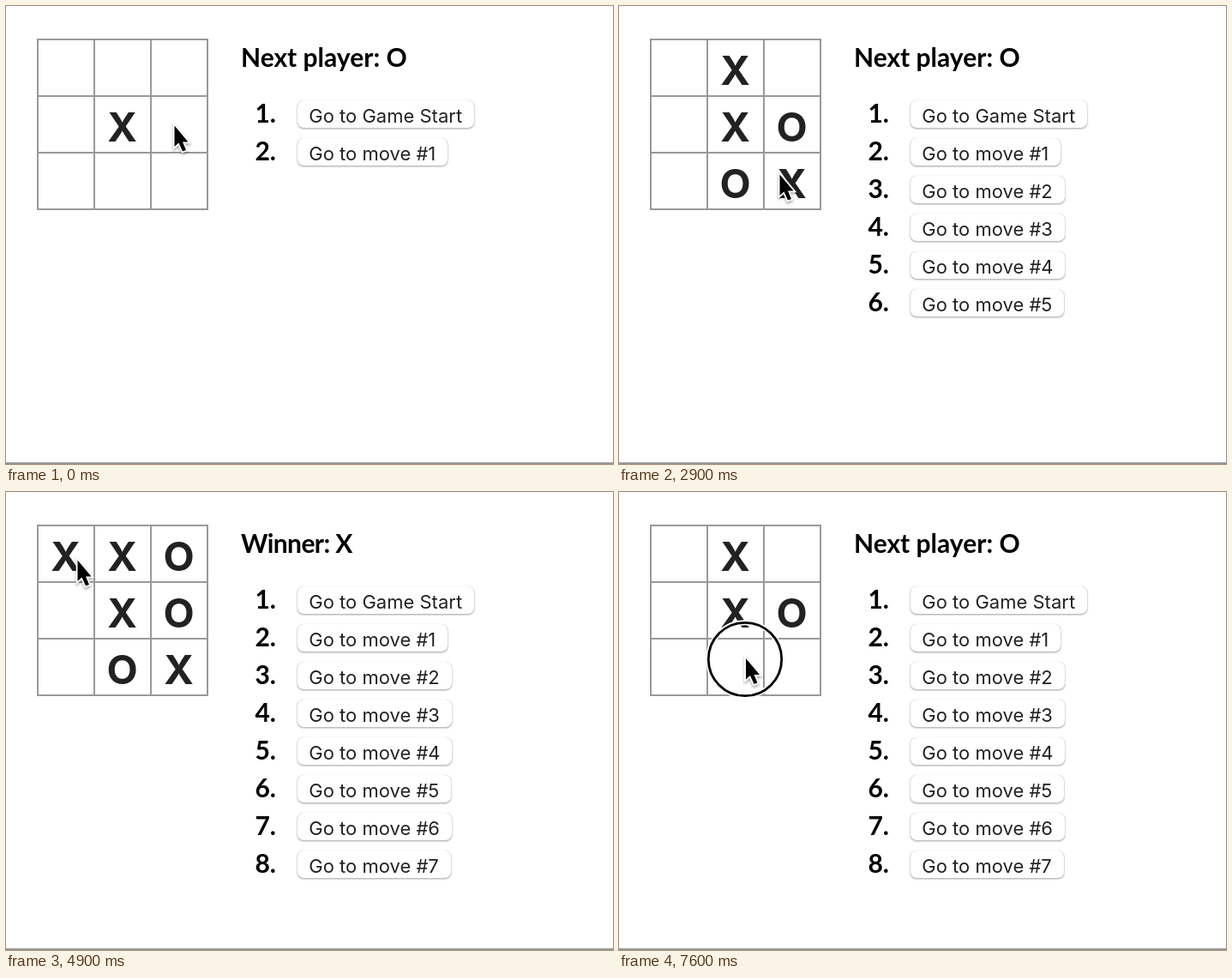
An HTML page that plays this animation: 708 px wide and 534 px high, repeating every 8 s.

```html
<!DOCTYPE html>
<html lang="en">
<head>
<meta charset="utf-8">
<title>Tic-tac-toe</title>
<style>
  html, body { margin: 0; width: 100%; height: 100%; overflow: hidden; background: #fff; }
  svg { display: block; width: 708px; height: 534px; }
  .grid { fill: none; stroke: #999; stroke-width: 2; }
  .mark { font: 700 47px Inter, "Open Sans", sans-serif; fill: #222; text-anchor: middle; }
  .title, .num { font: 700 30px Lato, "Open Sans", sans-serif; }
  .title.won { letter-spacing: -.6px; }
  .num { text-anchor: end; }
  .btn rect { fill: #fff; filter: drop-shadow(0 1px 1px rgba(0, 0, 0, .3)) drop-shadow(0 0 .6px rgba(0, 0, 0, .35)); }
  .btn text { font: 400 22px Inter, "Open Sans", sans-serif; fill: #222; }
  .btn.down rect { fill: #efefef; }
  .ring { fill: none; }
  .arrow { filter: drop-shadow(0 2px 1.5px rgba(0, 0, 0, .35)); }
</style>
</head>
<body>
<svg viewBox="0 0 708 534">
  <path class="grid" d="M37 39H235V237H37ZM103 39V237M169 39V237M37 105H235M37 171H235"/>
  <rect y="532" width="708" height="2" fill="#999"/>
  <g id="marks"></g>
  <text id="title" class="title" x="274" y="71"></text>
  <g id="list"></g>
  <g id="pointer">
    <g id="ring" class="ring">
      <circle r="42.7" stroke="#fff" stroke-width="6"/>
      <circle r="42.7" stroke="#000" stroke-width="2.8"/>
    </g>
    <path class="arrow" d="M1-1V23.5L6 19 10.5 29 14.5 27.5 10.5 18H17Z" stroke="#fff" stroke-width="3.6" paint-order="stroke"/>
  </g>
</svg>
<script>
const LOOP = 8000, TICK = 100;
const BOARD = 36, CELL = 66, ROW = 44, PAD = 14;
const LINES = '012 345 678 036 147 258 048 246'.split(' ');
const $ = id => document.getElementById(id);

// Pointer steps: leave, arrive, x, y and, for a click, the release time.
// The button goes down on arrival.
const origin = [195.5, 140.5];
const steps = [
  [0, 200, 189.5, 141, 300],
  [400, 1200, 141.5, 83.5, 1300],
  [1300, 1800, 162, 196.5],
  [1800, 2000, 160.5, 196.5, 2100],
  [2300, 2700, 186.5, 197.5, 2900],
  [3100, 3700, 197.5, 60.5, 3900],
  [4200, 4300, 193, 61],
  [4300, 4800, 82.5, 80.5, 4900],
  [5200, 5800, 398.5, 287],
  [6000, 6400, 401, 261.5, 6500],
  [6600, 6700, 309, 241.5],
  [7000, 7600, 147, 195, LOOP]
];

const ease = p => p * p * (3 - 2 * p);
const show = (el, on) => { el.style.display = on ? '' : 'none'; };
const cellAt = (x, y) => Math.floor((y - BOARD) / CELL) * 3 + Math.floor((x - BOARD) / CELL);
const rowAt = y => Math.round((y - 126) / ROW);
const onBoard = x => x < BOARD + 3 * CELL;

function add(parent, tag, attrs, text = '') {
  const el = document.createElementNS('http://www.w3.org/2000/svg', tag);
  for (const k in attrs) el.setAttribute(k, attrs[k]);
  el.textContent = text;
  parent.append(el);
  return el;
}

const marks = Array.from({ length: 9 }, (_, c) => add($('marks'), 'text', {
  class: 'mark', x: 69.5 + c % 3 * CELL, y: 92 + Math.floor(c / 3) * CELL
}));

const rows = Array.from({ length: 8 }, (_, i) => {
  const row = add($('list'), 'g', { transform: `translate(0 ${i * ROW})` });
  add(row, 'text', { class: 'num', x: 315, y: 136 }, `${i + 1}.`);
  const btn = add(row, 'g', { class: 'btn' });
  const box = add(btn, 'rect', { x: 340, y: 110, height: 32, rx: 7 });
  const label = add(btn, 'text', { x: 340 + PAD - .7, y: 136 }, i ? `Go to move #${i}` : 'Go to Game Start');
  box.setAttribute('width', Math.round(label.getComputedTextLength()) + 2 * PAD - 1);
  return { row, btn };
});

// Replays the pointer and the game up to time t.
function stateAt(t) {
  const s = { x: origin[0], y: origin[1], history: [4], shown: 1, pressed: false };
  for (const [leave, arrive, x, y, release] of steps) {
    if (t <= leave) break;
    const p = ease(Math.min(1, (t - leave) / (arrive - leave)));
    s.x += (x - s.x) * p;
    s.y += (y - s.y) * p;
    s.pressed = t >= arrive && t < release;
    if (t >= release) {
      if (onBoard(x)) s.shown = s.history.push(cellAt(x, y));
      else s.shown = rowAt(y);
    }
  }
  return s;
}

function draw(now) {
  const t = Math.floor(now % LOOP / TICK) * TICK;
  const { x, y, history, shown, pressed } = stateAt(t);

  const board = Array(9).fill('');
  history.slice(0, shown).forEach((c, i) => { board[c] = 'XO'[i % 2]; });
  marks.forEach((m, c) => { m.textContent = board[c]; });

  const line = LINES.find(([a, b, c]) => board[a] && board[a] === board[b] && board[a] === board[c]);
  $('title').textContent = line ? `Winner: ${board[line[0]]}` : `Next player: ${'XO'[shown % 2]}`;
  $('title').classList.toggle('won', !!line);

  rows.forEach(({ row, btn }, i) => {
    show(row, i <= history.length);
    btn.classList.toggle('down', pressed && !onBoard(x) && i === rowAt(y));
  });

  $('pointer').setAttribute('transform', `translate(${x} ${y})`);
  show($('ring'), pressed);
}

function frame() {
  draw(performance.now());
  requestAnimationFrame(frame);
}
frame();
</script>
</body>
</html>
```
